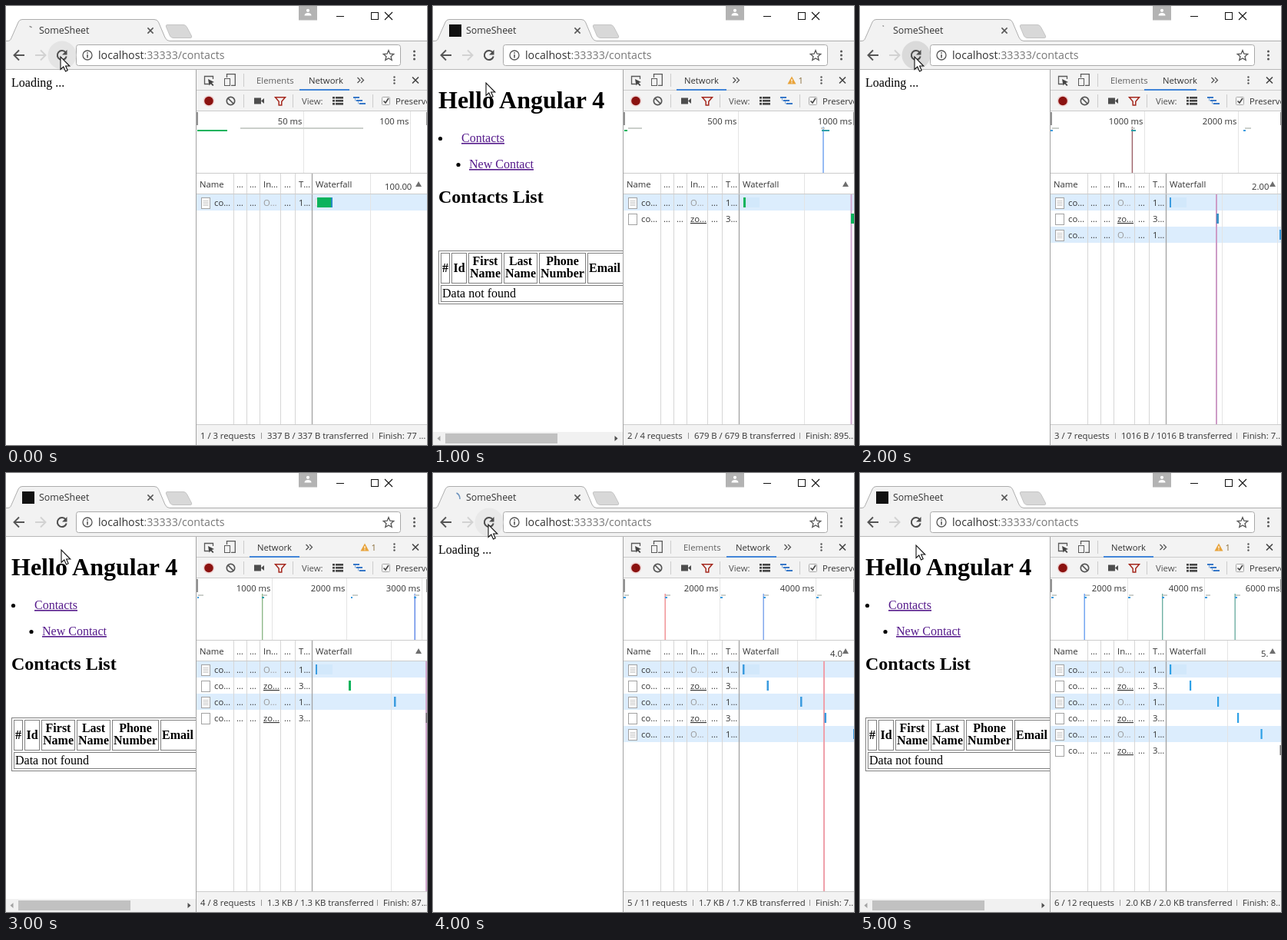
An HTML page for the animation above (6000 ms loop, 548 by 571 pixels).

```html
<!DOCTYPE html>
<html lang="en">
<head>
<meta charset="utf-8">
<title>Page reload with network panel</title>
<style>
  html, body { margin: 0; width: 100%; height: 100%; overflow: hidden; background: #fff; }
  svg { display: block; width: 548px; height: 571px; }
  text { font: 11.3px "Open Sans", "Noto Sans", sans-serif; fill: #333; white-space: pre; }
  .page text { font: 16px "Liberation Serif", "Times New Roman", serif; fill: #000; }
  .page .bold { font-weight: bold; }
  .page .h1 { font-size: 32px; font-weight: bold; }
  .page .h2 { font-size: 24px; font-weight: bold; }
  .page .link { fill: #551a8b; text-decoration: underline; }
</style>
</head>
<body>
<svg id="stage" viewBox="0 0 548 571" xmlns="http://www.w3.org/2000/svg"></svg>
<script>
const STEP = 1000;

const rect = (x, y, w, h, fill, more = '') =>
  `<rect x="${x}" y="${y}" width="${w}" height="${h}" fill="${fill}" ${more}/>`;
const box = (x, y, w, h, stroke, fill = 'none', more = '') =>
  rect(x + .5, y + .5, w - 1, h - 1, fill, `stroke="${stroke}" ${more}`);
const line = (d, stroke, width = 1, more = '') =>
  `<path d="${d}" fill="none" stroke="${stroke}" stroke-width="${width}" ${more}/>`;
const shape = (d, fill, more = '') => `<path d="${d}" fill="${fill}" ${more}/>`;
const disc = (x, y, r, fill, more = '') =>
  `<circle cx="${x}" cy="${y}" r="${r}" fill="${fill}" ${more}/>`;
const text = (x, y, s, more = '') => `<text x="${x}" y="${y}" ${more}>${s}</text>`;
const group = (items, more = '') => `<g ${more}>${items.join('')}</g>`;
const cross = (x, y, r, stroke, width) =>
  line(`M${x - r} ${y - r}L${x + r} ${y + r}M${x + r} ${y - r}L${x - r} ${y + r}`, stroke, width);
const dots = (x, y, gap, r) => [-gap, 0, gap].map(d => disc(x, y + d, r, '#555')).join('');
const end = 'text-anchor="end"';
const middle = 'text-anchor="middle"';

function windowFrame() {
  return group([
    rect(0, 0, 548, 571, '#fff'),
    rect(381, 0, 24, 18.5, '#b3b3b3'),
    disc(393, 5.8, 2.1, '#fff'),
    shape('M388.5 12.5Q388.5 9 393 9T397.500 12.500Z', '#fff'),
    line('M430 13.5H440', '#111'),
    box(475, 8, 10, 10, '#111'),
    cross(498, 13, 5, '#111', 1.1),
    rect(0, 46, 548, 37, '#f2f2f2'),
    shape('M-1 45.5H2C5 45.500 6 44 7 41.500L16 21Q17.500 17.500 21 17.500H193Q197 17.500 198.500 21' +
      'L207 41Q209 45.500 213 45.500H549V47H-1Z', '#f2f2f2'),
    line('M-1 45.5H2C5 45.500 6 44 7 41.500L16 21Q17.500 17.500 21 17.500H193Q197 17.500 198.500 21' +
      'L207 41Q209 45.500 213 45.500H549', '#adadad'),
    shape('M210 24.5H231Q234 24.500 235.500 27.500L241.500 39Q242.500 41.500 240 41.500H218' +
      'Q215 41.500 213.500 39L208.500 27Q207.500 24.500 210 24.500Z', '#d8d8d8', 'stroke="#c4c4c4"'),
    text(43, 36, 'SomeSheet', 'style="font-size:12.4px"'),
    cross(188, 32, 3.6, '#555', 1.5),
    line('M0 82.5H548', '#b8b8b8'),
    line('M24 64H11M17 57.500L10.500 64L17 70.500', '#555', 1.9),
    line('M38 64H51M45 57.500L51.500 64L45 70.500', '#d2d2d2', 1.9)
  ]);
}

function addressBar() {
  return group([
    box(91, 50, 423, 28, '#a9a9a9', '#fff', 'rx="3"'),
    disc(106, 64, 6, 'none', 'stroke="#555" stroke-width="1.3"'),
    rect(105.2, 63, 1.6, 4.5, '#555'),
    rect(105.2, 60.3, 1.6, 1.6, '#555'),
    text(120, 69, 'localhost<tspan fill="#777">:33333/contacts</tspan>', 'style="font-size:14.2px"'),
    line('M498 57.7L499.900 62.200L504.700 62.600L501 65.700L502.200 70.400L498 67.900' +
      'L493.800 70.400L495 65.700L491.300 62.600L496.100 62.200Z', '#555', 1.3),
    dots(531.5, 64, 5, 1.5)
  ]);
}

function reloadButton(hover) {
  return group([
    hover ? disc(73, 64, 18.5, hover) : '',
    line('M77.7 60.500A6 6 0 1 0 78.700 65.500', '#4d4d4d', 2),
    shape('M79.5 57V63.500H73Z', '#4d4d4d')
  ]);
}

function loadingPage() {
  return text(7, 105, 'Loading ...');
}

function contactsPage() {
  const heads = [
    [10, 12, '#'], [24, 20, 'Id'], [46, 44, 'First', 'Name'], [92, 44, 'Last', 'Name'],
    [138, 61, 'Phone', 'Number'], [201, 45, 'Email']
  ];
  const cells = heads.map(([x, w, top, low]) => {
    const bold = `${middle} class="bold"`;
    const open = top === 'Email' ? 20 : 0;
    return box(x, 321, w + open, 40, '#808080') +
      text(x + w / 2, low ? 337 : 346, top, bold) +
      (low ? text(x + w / 2, 353, low, bold) : '');
  });
  return group([
    text(7, 133, 'Hello Angular 4', 'class="h1"'),
    disc(9.5, 172.5, 2.6, '#000'),
    text(37, 177, 'Contacts', 'class="link"'),
    disc(33, 206.5, 2.6, '#000'),
    text(47, 211, 'New Contact', 'class="link"'),
    text(7, 256, 'Contacts List', 'class="h2"'),
    box(7, 318, 300, 70, '#808080'),
    ...cells,
    box(10, 363, 300, 22, '#808080'),
    text(12, 379, 'Data not found'),
    rect(0, 554, 247, 17, '#f1f1f1'),
    rect(16, 556, 146, 13, '#c1c1c1'),
    shape('M9.500 559V566L5.500 562.500Z', '#a3a3a3'),
    shape('M236.500 559V566L240.500 562.500Z', '#505050')
  ]);
}

function devtoolsFrame() {
  const bars = [[83, 26], [110, 26], [545, 26]];
  return group([
    rect(248, 83, 300, 488, '#fff'),
    ...bars.map(([y, h]) => rect(248, y, 300, h, '#f3f3f3')),
    ...[109.5, 136.5, 217.5, 544.5].map(y => line(`M248 ${y}H548`, '#ccc')),
    line('M309.500 88V105M309.500 115V132M373.500 115V132M477.500 115V132', '#ccc'),
    // inspect and device buttons
    line('M264 101.500H258.500V91.500H269.500V95', '#5a5a5a', 1.3),
    shape('M263 95L271 99L267.800 100L270.500 103L269 104L266.500 101.200L264.500 103.500Z', '#444'),
    line('M287.500 93V88.700H298.300V103.300H293', '#5a5a5a', 1.3),
    box(284, 94, 8, 10, '#5a5a5a', '#f3f3f3'),
    dots(505.5, 96.5, 4, 1.2),
    cross(533, 96.500, 4, '#444', 1.6),
    // network controls
    disc(264, 123.500, 7.3, '#eed3d3'),
    disc(264, 123.500, 5.8, '#8b1210'),
    disc(292.5, 123.500, 5.2, 'none', 'stroke="#555" stroke-width="1.7"'),
    line('M289 120L296 127', '#555', 1.7),
    rect(323, 119.500, 9, 8, '#4d4d4d'),
    shape('M332 123.500L336 120V127Z', '#4d4d4d'),
    line('M350.500 118.700H363.500L358.800 124.300V129H355.200V124.300Z', '#a5281e', 1.5),
    text(385, 128, 'View:', 'fill-opacity=".85"'),
    ...[118, 122, 126].map(y => rect(425, y, 3, 2.6, '#444') + rect(429, y, 10, 2.6, '#444')),
    ...[[452, 118], [456, 122], [460, 126]].map(([x, y]) => rect(x, y, 8, 2, '#3878c8')),
    line('M454.500 120V123H456M458.500 124V127H460', '#8ab0dc'),
    box(489, 118, 11, 11, '#a8a8a8', '#f8f8f8', 'rx="1"'),
    line('M491.500 123.500L494 126L498 120', '#444', 1.6),
    text(507, 128, 'Preserve log')
  ]);
}

function panelTabs(s) {
  const chevron = s.loading ? 457.5 : 390.5;
  return group([
    s.loading ? text(326, 101, 'Elements', 'style="fill:#5f5f5f"') : '',
    text(s.loading ? 394 : 327, 101, 'Network'),
    rect(s.line[0], 108, s.line[1], 2, '#4285d8'),
    line([0, 4.5].map(d => `M${chevron + d} 93L${chevron + d + 3.5} 96.500L${chevron + d} 100`).join(''),
      '#555', 1.3),
    s.loading ? '' : shape('M467 91.500L472.500 101.500H461.500Z', '#e8a33a') +
      rect(466.400, 95, 1.2, 3.3, '#fff') + rect(466.400, 99.200, 1.2, 1.1, '#fff') +
      text(475.5, 101, '1', 'style="fill:#8a6d3b"')
  ]);
}

function overview(s) {
  return group([
    ...s.ticks.map(([x, label]) =>
      line(`M${x + .5} 137V217`, '#e4e4e4') + text(x - 1.5, 154, label, end)),
    ...s.events.map(([x, color]) => rect(x, 157, 1.4, 60, color)),
    ...s.strips.map(([x, w, gray, grayW, color]) =>
      rect(gray, 158, grayW, 2, '#cbcfcb') + rect(x, 161, w, 2, color)),
    rect(248, 138, 2, 17, '#929292'),
    rect(547, 138, 1, 17, '#929292')
  ]);
}

function requestRow(i, [x, w, color]) {
  const y = 245 + 21 * i, base = y + 15, doc = i % 2 === 0;
  return group([
    box(254, y + 4, 12, 15, '#a2a2a2', '#fff'),
    doc ? line([8, 10, 12, 14].map(d => `M256.500 ${y + d + .5}H263.500`).join(''), '#c9c9c9') : '',
    text(271, base, 'co…'),
    ...[300, 317, 362].map(px => text(px, base, '…')),
    text(335, base, doc ? 'O…' : 'zo…', doc ? 'style="fill:#999"' : 'text-decoration="underline"'),
    text(381, base, doc ? '1…' : '3…'),
    rect(x, y + 4, w, 13, color)
  ]);
}

function requestTable(s) {
  const rows = s.bars.map((_, i) => i % 2 ? '' : rect(248, 245 + 21 * i, 300, 21, '#dcedfd'));
  return group([
    ...rows,
    ...[296, 313, 330, 357, 376].map(x => line(`M${x + .5} 218V544`, '#d6d6d6')),
    line('M398.500 218V544', '#a3a3a3', 1.3),
    ...s.grid.map(x => line(`M${x + .5} 218V544`, '#e4e4e4')),
    line('M248 244.500H548', '#ccc'),
    ...[[252, 'Name'], [300, '…'], [317, '…'], [335, 'In…'], [362, '…'], [381, 'T…'], [403, 'Waterfall']]
      .map(([x, label]) => text(x, 236, label)),
    s.scale ? text(s.scale[0], 239, s.scale[1]) : '',
    shape('M537 228L541 235H533Z', '#6e6e6e'),
    s.first ? rect(403, 251, 2, 9, '#fff', 'stroke="#bbb" stroke-width=".5"') + rect(423, 249, 2, 13, '#2a8bc6')
      : rect(405, 249, 20, 13, '#d2e8fb'),
    s.mark ? rect(s.mark[0], 245, 2, 299, s.mark[1]) : '',
    ...s.bars.map((bar, i) => requestRow(i, bar))
  ]);
}

function footer([requests, size, finish, a, b]) {
  return group([
    text(253, 563, requests),
    line(`M${a + .5} 555V563M${b + .5} 555V563`, '#999'),
    text(a + 8, 563, size + ' transferred'),
    text(b + 8, 563, `Finish: ${finish}…`)
  ]);
}

function cursor([x, y]) {
  return shape('M0 0V16.500L3.800 13L6.500 19L9.200 17.800L6.600 12H11.800Z', '#fff',
    `stroke="#111" stroke-width="1.1" transform="translate(${x} ${y})"`);
}

const GREEN = '#0bb35c', BLUE = '#3b9bdf', TEAL = '#2f9ea8';
// overview strip: short bar with a gray bar after it
const strip = (x, color = BLUE) => [x, 3, x + 1, 6, color];

const scenes = [
  {
    loading: true, hover: '#e4e4e4', cursor: [71, 66], line: [382, 65], first: true,
    spinner: ['M30.500 26.500Q32 26.500 33.500 28', '#888'],
    ticks: [[387, '50 ms'], [526, '100 ms']], events: [],
    strips: [[249, 39, 305, 160, GREEN]],
    grid: [474], scale: [493, '100.00'], bars: [[405, 18, GREEN]],
    footer: ['1 / 3 requests', '337 B / 337 B', '77 ', 332, 477]
  },
  {
    cursor: [69, 100], line: [317, 65],
    ticks: [[397, '500 ms'], [547, '1000 ms']], events: [[507.3, '#6a9ff0']],
    strips: [[249, 4, 254, 18, GREEN], [506, 10, 505, 5, TEAL]],
    grid: [483], mark: [543.5, '#cfa6cf'], bars: [[404, 3, GREEN], [544, 4, GREEN]],
    footer: ['2 / 4 requests', '679 B / 679 B', '895', 332, 477]
  },
  {
    loading: true, hover: '#dadada', cursor: [71, 66], line: [370, 68],
    spinner: ['M29.500 25.500L31 26.500', '#888'],
    ticks: [[370, '1000 ms'], [492, '2000 ms']], events: [[353.7, '#9c6068']],
    strips: [[248, 3, 250, 9, BLUE], [353, 6, 353, 5, TEAL], [499, 3, 501, 8, BLUE]],
    grid: [471, 543], scale: [510, '2.00'], mark: [463, '#cd9cc6'],
    bars: [[403, 2, BLUE], [464, 3, '#3d91c4'], [546, 2, BLUE]],
    footer: ['3 / 7 requests', '1016 B / 1016 B', '7', 332, 490]
  },
  {
    cursor: [72, 100], line: [317, 65],
    ticks: [[346, '1000 ms'], [443, '2000 ms'], [541, '3000 ms']],
    events: [[333, '#8fb98a'], [531.5, '#5c86e8']],
    strips: [[249, 2, 250, 7, BLUE], strip(333, TEAL), [449, 2, 451, 7, BLUE], strip(531)],
    grid: [501], mark: [546, '#d1a9ce'],
    bars: [[403, 2, BLUE], [446, 3, GREEN], [505, 2.5, BLUE], [546.5, 2, '#777']],
    footer: ['4 / 8 requests', '1.3 KB / 1.3 KB', '87', 332, 483]
  },
  {
    loading: true, hover: '#e9e9e9', cursor: [72, 67], line: [382, 65],
    spinner: ['M30.500 26Q35 28 35 34', '#6d93bd'],
    ticks: [[373, '2000 ms'], [498, '4000 ms']],
    events: [[301.5, '#f08c90'], [429.5, '#78a2ec']],
    strips: [248, 302, 374, 430, 499].map(x => strip(x)),
    grid: [474], scale: [517, '4.0'], mark: [508, '#efa0ab'],
    bars: [403, 434.5, 478, 509.5, 547].map(x => [x, 2.5, BLUE]),
    footer: ['5 / 11 requests', '1.7 KB / 1.7 KB', '7', 338, 490]
  },
  {
    cursor: [73, 94], line: [317, 65],
    ticks: [[348, '2000 ms'], [448, '4000 ms'], [548, '6000 ms']],
    events: [[291.5, '#6a9ff0'], [393, '#6fb0a4'], [487.5, '#6fb0a4']],
    strips: [249, 292, 349, 393, 449, 488].map(x => strip(x)),
    grid: [478], scale: [522, '5.'],
    bars: [403, 429, 465, 491, 521.5, 546.5].map(x => [x, 2.2, x > 546 ? '#777' : '#2ea0e6']),
    footer: ['6 / 12 requests', '2.0 KB / 2.0 KB', '8', 338, 490]
  }
];

const drawScene = s => group([
  s.loading ? line(s.spinner[0], s.spinner[1], 1.5) : rect(21, 24, 16, 16, '#111'),
  reloadButton(s.hover),
  group([s.loading ? loadingPage() : contactsPage()], 'class="page" clip-path="url(#left)"'),
  panelTabs(s), overview(s), requestTable(s), footer(s.footer),
  line('M247.500 83V571', '#a3a3a3'),
  cursor(s.cursor)
], 'class="scene" visibility="hidden"');

const stage = document.getElementById('stage');
stage.innerHTML = `<clipPath id="left">${rect(0, 83, 247, 488, '#000')}</clipPath>` +
  windowFrame() + addressBar() + devtoolsFrame() + scenes.map(drawScene).join('');

const layers = [...stage.querySelectorAll('.scene')];
const start = performance.now();

function show(now) {
  const current = Math.floor(Math.max(0, now - start) / STEP) % layers.length;
  layers.forEach((layer, i) => layer.setAttribute('visibility', i === current ? 'visible' : 'hidden'));
  requestAnimationFrame(show);
}
show(start);
</script>
</body>
</html>
```
